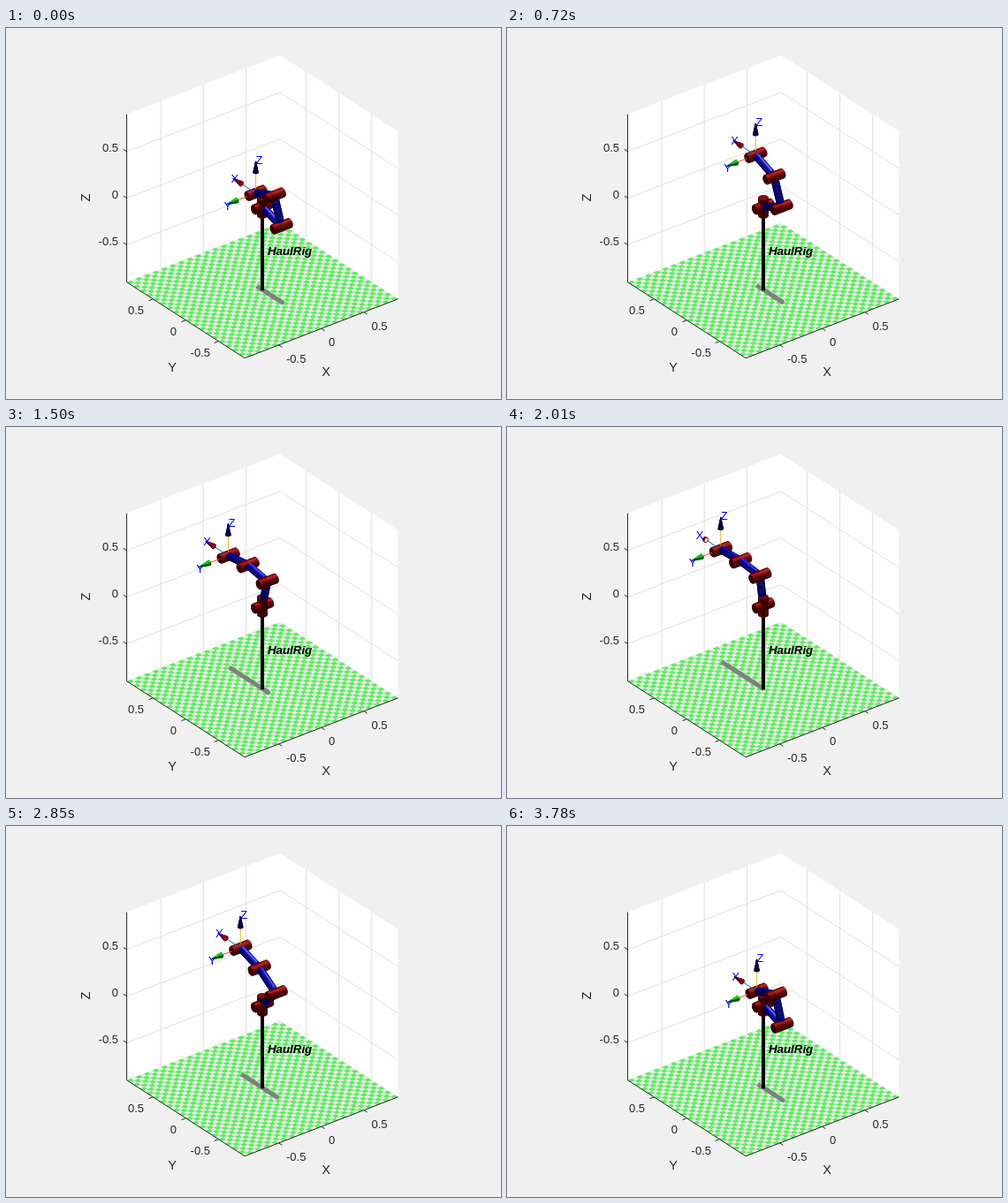
Write an HTML page that moves like this. It is 560x420 px and loops after 3.81 s.

```html
<!DOCTYPE html>
<html lang="en">
<head>
<meta charset="utf-8">
<title>Planar arm</title>
<style>
html, body { margin: 0; width: 100%; height: 100%; overflow: hidden; background: #f0f0f0; }
svg { display: block; width: 560px; height: 420px; font-family: Arial, "Liberation Sans", sans-serif; }
.tick { font-size: 13px; fill: #262626; }
.title { font-size: 14.6px; fill: #262626; text-anchor: middle; }
.name { font-size: 13.3px; font-weight: bold; font-style: italic; }
.label { font-size: 13px; fill: #00f; text-anchor: middle; }
#arm { stroke-linejoin: round; }
</style>
</head>
<body>
<svg viewBox="0 0 560 420">
  <rect width="560" height="420" fill="#f0f0f0"/>
  <g id="room"></g>
  <g id="arm"></g>
</svg>
<script>
const LIM = 0.9, LINK = 0.3, R = 0.045, HALF = 0.1;
const STEP = 30, FRAMES = 127, SEG = 21;
const VIEW = [-0.527, -0.687, 0.5], LIGHT = [0, -0.35, 0.937];
const X = [1, 0, 0], Y = [0, 1, 0], Z = [0, 0, 1];
const RED = { rgb: [138, 0, 0], shine: 35 }, BLUE = { rgb: [0, 0, 205], shine: 110 };
const CONES = [[190, 0, 0], [0, 205, 0], [0, 0, 150]].map(rgb => ({ rgb, shine: 30 }));

// tool waypoints: y, z, tool angle in degrees, height of the arc to the next one
const WAY = [
  [0.1, 0.1, -19.5, 0], [0.1, 0.5, 21.5, 0.045], [0.45, 0.3, -8, 0], [0.65, 0.3, -4, 0],
  [0.65, 0.4, 8, 0], [0.1, 0.5, 23, 0], [0.1, 0.1, -17.5, 0]
];

const dot = (a, b) => a[0] * b[0] + a[1] * b[1] + a[2] * b[2];
const add = (a, b, k = 1) => a.map((v, i) => v + k * b[i]);
const project = p => [
  290 + 96.3 * p[0] - 74.2 * p[1],
  202.2 - 37.2 * p[0] - 47.8 * p[1] - 105.6 * p[2]
];
const pts = list => list.map(p => project(p).map(v => v.toFixed(2)).join(",")).join(" ");
const poly = (list, fill, extra = "") => `<polygon points="${pts(list)}" fill="${fill}" ${extra}/>`;
const line = (list, color, width, extra = "") =>
  `<polyline points="${pts(list)}" fill="none" stroke="${color}" stroke-width="${width}" ${extra}/>`;
const text = (x, y, s, cls, extra = "") => `<text x="${x}" y="${y}" class="${cls}" ${extra}>${s}</text>`;

function shade(n, { rgb, shine }) {
  const d = Math.max(0, dot(n, LIGHT));
  const lum = 0.4 + 0.62 * d ** 3, spec = shine * d ** 18;
  return `rgb(${rgb.map(c => Math.min(255, Math.round(c * lum + spec))).join()})`;
}

// shaded tube or cone along d, from s0 to s1
function tube(c, d, u, v, s0, s1, r0, r1, paint, capFill) {
  const N = 24, normal = i => {
    const a = i * 2 * Math.PI / N;
    return add(u.map(k => k * Math.cos(a)), v, Math.sin(a));
  };
  const ring = (s, r, i) => add(add(c, d, s), normal(i), r);
  let out = "";
  for (let i = 0; i < N; i++) {
    const n = normal(i + 0.5);
    if (dot(n, VIEW) < -0.1) continue;
    const col = shade(n, paint);
    out += poly([ring(s0, r0, i), ring(s0, r0, i + 1), ring(s1, r1, i + 1), ring(s1, r1, i)],
      col, `stroke="${col}" stroke-width=".5"`);
  }
  const near = dot(d, VIEW) < 0;
  const cap = [...Array(N).keys()].map(i => near ? ring(s0, r0, i) : ring(s1, r1, i));
  const face = shade(near ? d.map(k => -k) : d, paint);
  return out + poly(cap, capFill || face, capFill ? `stroke="${face}"` : "");
}

const hinge = (c, from = -HALF, to = HALF) => tube(c, X, Y, Z, from, to, R, R, RED);

function drawRoom() {
  const l = LIM, ticks = [-0.5, 0, 0.5], grid = "#dfdfdf", ink = "#262626";
  let out = poly([[-l, l, -l], [-l, l, l], [l, l, l], [l, -l, l], [l, -l, -l], [l, l, -l]], "#fefefe");
  for (const t of ticks) {
    out += line([[t, l, -l], [t, l, l]], grid, 1);
    out += line([[l, t, -l], [l, t, l]], grid, 1);
    out += line([[-l, l, t], [l, l, t], [l, -l, t]], grid, 1);
  }
  out += poly([[-l, -l, -l], [l, -l, -l], [l, l, -l], [-l, l, -l]], "#e6ebe6");
  const s = 0.05, n = 36;
  let tiles = "";
  for (let i = 0; i < n; i++) {
    for (let j = 1 - i % 2; j < n; j += 2) {
      const x = -l + i * s, y = -l + j * s;
      tiles += "M" + pts([[x, y, -l], [x + s, y, -l], [x + s, y + s, -l], [x, y + s, -l]]) + "Z";
    }
  }
  out += `<path d="${tiles}" fill="#5fec5f"/>`;
  out += line([[-l, l, l], [-l, l, -l], [-l, -l, -l], [l, -l, -l]], ink, 1);
  const o = l + 0.05;
  for (const t of ticks) {
    out += line([[-l, l, t], [-l, o, t]], ink, 1);
    out += line([[-l, t, -l], [-o, t, -l]], ink, 1);
    out += line([[t, -l, -l], [t, -o, -l]], ink, 1);
  }
  const end = 'text-anchor="end"';
  [["0.5", 127, 140], ["0", 127, 193], ["-0.5", 127, 246],
   ["0.5", 156, 324], ["0", 193, 348], ["-0.5", 231, 372]]
    .forEach(([s, x, y]) => out += text(x, y, s, "tick", end));
  [["-0.5", 317, 379], ["0", 365, 360], ["0.5", 413.5, 342]]
    .forEach(([s, x, y]) => out += text(x, y, s, "tick"));
  out += text(362, 394, "X", "title") + text(188, 389, "Y", "title");
  out += text(0, 0, "Z", "title", 'transform="translate(94.5 192) rotate(-90)"');
  document.getElementById("room").innerHTML = out;
}

// constant acceleration, cruise, constant braking
function blend(k) {
  if (k < 1 / 3) return 2.25 * k * k;
  if (k > 2 / 3) return 1 - 2.25 * (1 - k) ** 2;
  return 0.25 + 1.5 * (k - 1 / 3);
}

function toolAt(n) {
  const seg = Math.min(WAY.length - 2, Math.floor(n / SEG));
  const s = blend(Math.min(1, (n - seg * SEG) / (SEG - 1)));
  const [y, z, deg, arc] = WAY[seg].map((v, i) => v + (WAY[seg + 1][i] - v) * s);
  return [y, z + 4 * arc * s, deg];
}

function solve([y, z, deg]) {
  const a3 = deg * Math.PI / 180;
  const wy = y - LINK * Math.cos(a3), wz = z - LINK * Math.sin(a3);
  const a1 = Math.atan2(wz, wy) + Math.acos(Math.min(1, Math.hypot(wy, wz) / (2 * LINK)));
  const elbow = [0, LINK * Math.cos(a1), LINK * Math.sin(a1)];
  const a2 = Math.atan2(wz - elbow[2], wy - elbow[1]);
  return { joints: [[0, 0, 0], elbow, [0, wy, wz], [0, y, z]], angles: [a1, a2, a3] };
}

function toolFrame(p) {
  const a = 0.22, b = 0.34, r = 0.024, back = [-1, 0, 0];
  const axis = (d, from, color) => line([add(p, d, from), add(p, d, a)], color, 1);
  const stop = Math.min(b, LIM - p[1]);
  const rim = stop < (a + b) / 2 ? "#f3dede" : "#9a0c0c";
  const [sx, sy] = project(p);
  return axis(Y, R, "#0072bd") + axis(Z, R, "#edb120") + axis(back, HALF, "#d95319") +
    tube(p, Y, X, Z, a, stop, r, r * (b - stop) / (b - a), CONES[0], rim) +
    tube(p, back, Y, Z, a, b, r, 0, CONES[1]) +
    tube(p, Z, X, Y, a, b, r, 0, CONES[2]) +
    text(sx - 23.8, sy - 11.8, "X", "label") +
    text(sx - 31.8, sy + 19.2, "Y", "label") +
    text(sx + 4, sy - 33, "Z", "label");
}

function draw(n) {
  const { joints, angles } = solve(toolAt(n));
  const parts = joints.map((p, i) => ({
    depth: dot(p, VIEW),
    svg: i ? hinge(p) : hinge(p) + tube(p, Z, X, Y, -HALF, HALF, R, R, RED) + hinge(p, -HALF, -R)
  }));
  angles.forEach((a, i) => {
    const d = [0, Math.cos(a), Math.sin(a)];
    const from = i ? R : Math.min(HALF / Math.abs(d[2]), R / Math.abs(d[1]));
    parts.push({
      depth: dot(add(joints[i], d, LINK / 2), VIEW),
      svg: tube(joints[i], d, X, [0, -d[2], d[1]], from, LINK - 0.02, 0.034, 0.034, BLUE)
    });
  });
  parts.sort((a, b) => a.depth - b.depth);
  const floor = joints.map(p => [0.01, p[1], -LIM]);
  document.getElementById("arm").innerHTML =
    line(floor, "#808080", 5) +
    line([[0, 0, -LIM], [0, 0, 0]], "#000", 4) +
    text(296, 257, "HaulRig", "name") +
    parts.map(p => p.svg).join("") + toolFrame(joints[3]);
}

drawRoom();
draw(0);
let start = null, last = 0;
function tick(now) {
  if (start === null) start = now;
  const n = Math.floor((now - start) / STEP) % FRAMES;
  if (n !== last) draw(last = n);
  requestAnimationFrame(tick);
}
requestAnimationFrame(tick);
</script>
</body>
</html>
```
